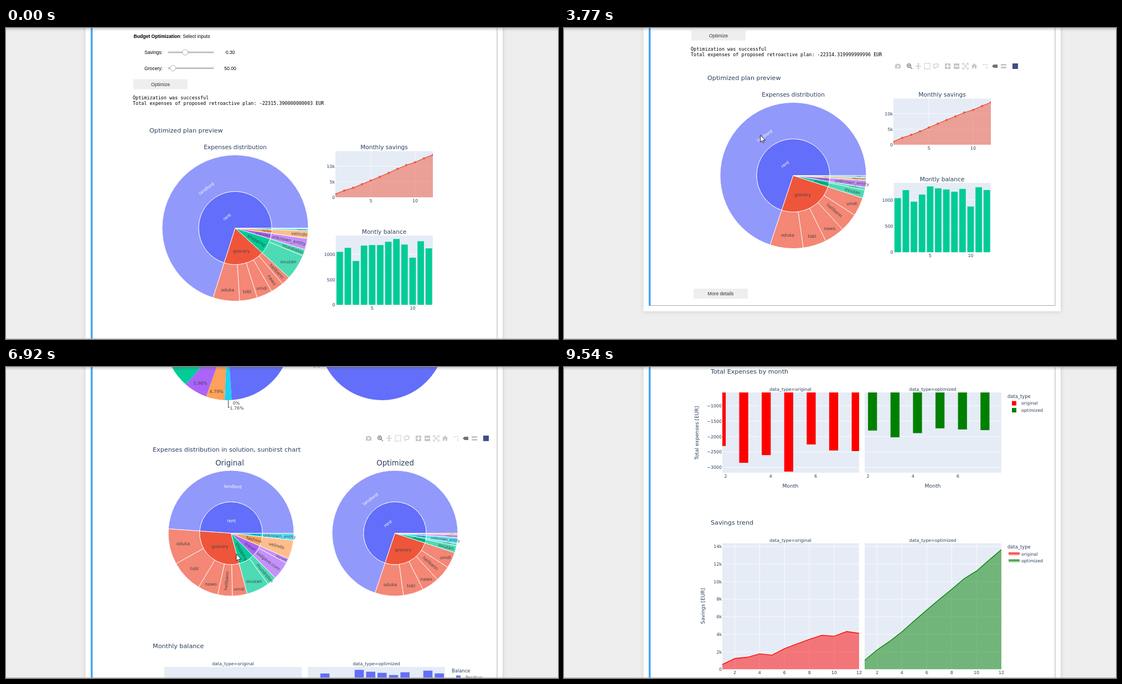
An HTML page with a canvas that plays this animation: 997 px wide and 562 px high, repeating every 9.65 s.

```html
<!DOCTYPE html>
<html lang="en">
<head>
<meta charset="utf-8">
<title>Budget optimization notebook</title>
<style>
html, body { margin: 0; width: 100%; height: 100%; overflow: hidden; background: #eee; }
canvas { display: block; }
</style>
</head>
<body>
<canvas id="stage" width="997" height="562"></canvas>
<script>
const ctx = document.getElementById('stage').getContext('2d');
const LOOP = 9650, INK = '#2a3f5f', PLOT = '#e5ecf6';
const SANS = '"Liberation Sans", Arial, sans-serif';
const CHART = '"DejaVu Sans", Verdana, sans-serif';
const MONO = '"DejaVu Sans Mono", monospace';
const COLOR = { rent: '#636efa', grocery: '#ef553b', shopping: '#00cc96', travel: '#ab63fa',
  fashion: '#ffa15a', unknown: '#19d3f3', income: '#ff6692' };
const PALETTE = Object.values(COLOR);

// Sunburst groups: name, label radius, label mode, children [name, degrees, label radius, mode].
// Modes: r = along the radius, t = along the arc, none = horizontal.
const OLD_PLAN = [
  ['rent', .19, 't', [['landlord', 252.4, .67, 't']]],
  ['grocery', .33, '', [['oduka', 21.1, .85], ['tobl', 14.1, .885], ['umdi', 12.4, .9], ['nawo', 10.4, .87, 'r'], ['hellbann', 7, .82, 'r']]],
  ['shopping', .335, 'r', [['ovuzan', 20.3, .86], ['mundrelon', 5.1, .84, 'r']]],
  ['unknown', .39, 'r', [['unknown_entity', 8.9, .75, 'r']]],
  ['fashion', .44, 'r', [['velindo', 6.1, .88, 'r']]],
  ['travel', .45, 'r', [['lodgavo.com', 1.7, .91, 'r'], ['skyvelt', .5, .9, 'r']]]];
const OPTIMIZED = [
  ['rent', .19, 't', [['landlord', 251.6, .67, 't']]],
  ['grocery', .29, '', [['oduka', 26.3, .82], ['tobl', 18.6, .87], ['nawo', 16, .88], ['hellbann', 14.65, .74, 'r'], ['umdi', 14.85, .89]]],
  ['shopping', .4, 'r', [['ovuzan', 6.5, .84, 'r'], ['mundrelon', 2, .84, 'r']]],
  ['unknown', .42, 'r', [['unknown_entity', 5.6, .81, 'r']]],
  ['travel', .45, 'r', [['lodgavo.com', 2.4, .9, 'r']]],
  ['fashion', .45, 'r', [['velindo', 1.5, .9, 'r']]]];
const BEFORE = [
  ['rent', .2, 't', [['landlord', 176, .745, 't']]],
  ['grocery', .275, '', [['oduka', 33, .78], ['tobl', 30, .81], ['nawo', 18.8, .87], ['hellbann', 13.5, .76, 'r'], ['umdi', 13.7, .895]]],
  ['shopping', .335, 'r', [['ovuzan', 21, .85], ['mundrelon', 8.7, .83, 'r']]],
  ['travel', .375, 'r', [['lodgavo.com', 17, .74, 'r'], ['skyvelt', 4.5, .89, 'r']]],
  ['fashion', .38, 'r', [['velindo', 17.3, .75, 'r']]],
  ['unknown', .4, 'r', [['unknown_entity', 6.5, .77, 'r']]]];

// Monthly balances
const OLD_BALANCE = [1050, 1130, 870, 1175, 1185, 1185, 1250, 1305, 1195, 935, 1260, 1120];
const OPT_BALANCE = [1035, 1187, 967, 1103, 1258, 1222, 1200, 1157, 1211, 875, 1243, 1189];
const RAW_BALANCE = [560, 685, 140, 390, -145, 735, 540, 520, 475, -110, 525, -200];
const running = a => { let sum = 0; return a.map(v => sum += v); };
const spent = a => a.map(v => v - 2992);

const SCROLL = [[0, 88], [2120, 88], [2120, 0], [3390, 0], [3700, 176], [5750, 176], [6200, 618], [6340, 618],
  [6740, 882], [6880, 882], [7390, 1219], [7550, 1411], [7730, 1411], [7850, 1641], [7900, 1677]];
const POINTER = [[70, 990, 575], [1030, 285, 103], [1250, 285, 103], [1400, 301, 72], [1600, 310, 72], [1780, 285, 107],
  [2030, 285, 107], [2400, 305, 124], [3390, 305, 124], [4300, 436, 308], [4950, 440, 325], [5170, 384, 338],
  [5420, 283, 479], [5560, 283, 479], [5750, 416, 338], [7900, 416, 338], [8670, 313, 70],
  [8710, 313, 70], [9150, 438, 182], [9200, 438, 182], [9540, 990, 575]];
// Toolbar: from, to, x, document y
const TOOLBARS = [[250, 800, 603, 252], [3750, 5400, 603, 245], [6340, 6520, 655, 682], [6520, 7000, 655, 1038],
  [7000, 7740, 655, 1392], [7740, 8000, 655, 1665], [8000, 8300, 655, 1937]];
const ICONS = [ // dx, path, active, filled
  [0, 'M-5-3h2l1-1.5h4l1 1.5h2v7h-10zM0-1.6a2 2 0 1 0 .01 0z', 0, 1],
  [21, 'M-1-4.4a3.4 3.4 0 1 0 .01 0zM1.5 1.5L5 5M-2.5-1h3M-1-2.5v3', 1],
  [37, 'M-5 0H5M0-5V5M-1.5-3.5L0-5 1.5-3.5M-1.5 3.5L0 5 1.5 3.5'],
  [53, 'M-5-5h2m1 0h2m1 0h2m1 0h1v2m0 1v2m0 1v2m0 1v1h-2m-1 0h-2m-1 0h-2m-1 0h-1v-2m0-1v-2m0-1v-2'],
  [69, 'M-3 2C-8-2-1-5 2-4.2S5 2 0 2.3-3 4-4 5'],
  [90, 'M-5-5H5V5H-5zM-1-3.5v2.5h-2.5v2h2.5v2.5h2v-2.5h2.5v-2h-2.5v-2.5z', 0, 1],
  [106, 'M-5-5H5V5H-5zM-3.5-1v2h7v-2z', 0, 1],
  [122, 'M-5-2v-3h3M2-5h3v3M5 2v3H2M-2 5h-3V2M-3-3L3 3M3-3L-3 3'],
  [138, 'M-5.5 0L0-5 5.5 0H4v4.5H1.2V1.5h-2.4v3H-4V0z', 0, 1],
  [158, 'M-4-3h2m1 0h2m1 0h2M3 0v2m0 1v2'],
  [175, 'M-5 0l3-3h7v6h-7z', 1, 1],
  [191, 'M-5-4H5v3H-5zM-5 1H5v3H-5z', 0, 1]].map(i => [i[0], new Path2D(i[1]), i[2], i[3]]);
const ARROW = new Path2D('M0 0V12.4L2.9 9.7 4.7 13.8 6.7 13 4.9 9H8.8Z');

const lerp = (a, b, k) => a + (b - a) * k;
const smooth = k => k * k * (3 - 2 * k);
const unit = (t, a, b) => Math.min(1, Math.max(0, (t - a) / (b - a)));
function track(keys, t, col = 1, ease = k => k) {
  const i = keys.findLastIndex(k => k[0] <= t), a = keys[Math.max(i, 0)], b = keys[i + 1];
  return i < 0 || !b ? a[col] : lerp(a[col], b[col], ease((t - a[0]) / (b[0] - a[0])));
}

function text(str, x, y, { size = 7.92, align = 'left', color = INK, font = CHART, turn = 0, weight = '' } = {}) {
  ctx.save();
  ctx.translate(x, y);
  ctx.rotate(turn * Math.PI / 180);
  ctx.font = `${weight} ${size}px ${font}`;
  ctx.textAlign = align;
  ctx.fillStyle = color;
  ctx.fillText(str, 0, size * .36);
  ctx.restore();
}
const label = (str, x, y, opts) => text(str, x, y, { align: 'center', ...opts });
const title = (str, y) => text(str, 265, y, { size: 11.2 });
function box(x, y, w, h, fill, stroke) {
  ctx.fillStyle = fill;
  ctx.fillRect(x, y, w, h);
  if (stroke) { ctx.strokeStyle = stroke; ctx.lineWidth = 1; ctx.strokeRect(x + .5, y + .5, w - 1, h - 1); }
}
function line(points, color, width = 1) {
  ctx.beginPath();
  points.forEach(p => ctx.lineTo(...p));
  ctx.strokeStyle = color;
  ctx.lineWidth = width;
  ctx.stroke();
}

function sunburst(cx, cy, R, groups, colorOf, zoom = 0) {
  const sizeOf = g => g[3].reduce((s, c) => s + c[1], 0);
  const g0 = sizeOf(groups[0]), g1 = g0 + sizeOf(groups[1]);
  const angle = a => lerp(a, unit(a, g0, g1) * 360, zoom);
  const labels = [];
  function sector(name, from, to, r0, r1, lr, mode, color, alpha) {
    const a = angle(from), b = angle(to), sweep = b - a, rad = Math.PI / 180;
    if (sweep < .1) return;
    ctx.beginPath();
    ctx.arc(cx, cy, r1, -a * rad, -b * rad, true);
    if (r0) ctx.arc(cx, cy, r0, -b * rad, -a * rad);
    else if (sweep < 359.9) ctx.lineTo(cx, cy);
    ctx.closePath();
    ctx.globalAlpha = alpha;
    ctx.fillStyle = color;
    ctx.fill();
    ctx.globalAlpha = 1;
    ctx.strokeStyle = '#fff';
    ctx.lineWidth = .9;
    ctx.stroke();
    const mid = (a + b) / 2, r = lerp(lr, r0 ? .75 : 0, zoom) * R;
    const size = zoom === 1 ? 7.92 : Math.min(7.92, .75 * sweep * rad * Math.max(r, 10));
    let turn = mode ? -mid + (mode === 't' ? 90 : 0) : 0;
    turn -= 180 * Math.round(turn / 180);
    if (size > 1.5) labels.push([name, cx + r * Math.cos(mid * rad), cy - r * Math.sin(mid * rad),
      { size, turn: turn * (1 - zoom), color: color === COLOR.rent ? '#fff' : '#444' }]);
  }
  let at = 0;
  groups.forEach(([name, lr, mode, children], i) => {
    const color = colorOf(name, i), start = at;
    for (const [child, size, childR, childMode] of children)
      sector(child, at, at += size, R / 2, R, childR, childMode, color, .7);
    sector(name, start, at, 0, R / 2, lr, mode, color, 1);
  });
  labels.forEach(l => label(...l));
}

function donut(cx, cy, name, slices) {
  let at = -Math.PI / 2;
  for (const [key, share] of slices) {
    ctx.beginPath();
    ctx.arc(cx, cy, 114, at, at + share * Math.PI * .02);
    ctx.arc(cx, cy, 45.5, at += share * Math.PI * .02, at - share * Math.PI * .02, true);
    ctx.fillStyle = COLOR[key];
    ctx.fill();
  }
  label(name, cx - 1, cy, { size: 13.2 });
}

function plot(x, y, w, h, [x0, x1], [y0, y1], xTicks, yTicks, { format = String, grid = false, yLabels = true } = {}) {
  const X = v => x + (v - x0) / (x1 - x0) * w, Y = v => y + h - (v - y0) / (y1 - y0) * h;
  box(x, y, w, h, PLOT);
  for (const v of xTicks) {
    if (grid) line([[X(v), y], [X(v), y + h]], '#fff', .8);
    label(v, X(v), y + h + 6);
  }
  for (const v of yTicks) {
    line([[x, Y(v)], [x + w, Y(v)]], '#fff', v ? .8 : 1.3);
    if (yLabels) text(format(v), x - 1, Y(v), { align: 'right' });
  }
  return { x, y, w, h, X, Y };
}
const inside = (p, draw) => {
  ctx.save();
  ctx.beginPath();
  ctx.rect(p.x, p.y, p.w, p.h);
  ctx.clip();
  draw();
  ctx.restore();
};
const bars = (p, values, width, shift, colorOf) => inside(p, () => values.forEach((v, i) => {
  const left = p.X(i + 1 + shift - width / 2), right = p.X(i + 1 + shift + width / 2);
  box(left, p.Y(Math.max(v, 0)), right - left, Math.abs(p.Y(v) - p.Y(0)), colorOf(v));
}));
const area = (p, values, color, dots) => inside(p, () => {
  const points = values.map((v, i) => [p.X(i + 1), p.Y(v)]);
  ctx.beginPath();
  [[p.X(1), p.Y(0)], ...points, [p.X(12), p.Y(0)]].forEach(q => ctx.lineTo(...q));
  ctx.globalAlpha = .5;
  ctx.fillStyle = color;
  ctx.fill();
  ctx.globalAlpha = 1;
  line(points, color, 1.35);
  if (dots) points.forEach(q => { ctx.beginPath(); ctx.arc(...q, 2, 0, 7); ctx.fill(); });
});
const kilo = v => v ? v / 1000 + 'k' : '0';
const minus = v => String(v).replace('-', '\u2212');
const range = (a, b, step) => Array.from({ length: Math.floor((b - a) / step) + 1 }, (_, i) => a + i * step);

function slider(y, name, knob, value) {
  text(name, 283, y, { size: 8.6, align: 'right', color: '#000', font: SANS });
  box(292.5, y - 1.4, 82.5, 2.8, '#bdbdbd');
  ctx.beginPath();
  ctx.arc(knob, y, 5.1, 0, 7);
  ctx.fillStyle = '#fff';
  ctx.fill();
  ctx.strokeStyle = '#9e9e9e';
  ctx.lineWidth = .8;
  ctx.stroke();
  label(value.toFixed(2), 405, y, { size: 8.6, color: '#000', font: SANS });
}
function button(name, x, y, [px, py]) {
  ctx.save();
  if (px > x && px < x + 98 && Math.abs(py - y) < 9) {
    ctx.shadowColor = 'rgba(0,0,0,.3)'; ctx.shadowBlur = 3; ctx.shadowOffsetY = 1.5;
  }
  box(x, y - 9, 98, 18, '#eee');
  ctx.restore();
  label(name, x + 49, y, { size: 8.6, color: '#333', font: SANS });
}

function toolbar(x, y) {
  for (const [dx, path, active, filled] of ICONS) {
    ctx.save();
    ctx.translate(x + dx, y);
    ctx.fillStyle = ctx.strokeStyle = `rgba(68,68,68,${active ? .75 : .3})`;
    ctx.lineWidth = 1.3;
    filled ? ctx.fill(path, 'evenodd') : ctx.stroke(path);
    ctx.restore();
  }
  box(x + 207, y - 5, 10, 10, '#3f4f85');
}

function preview(t, old) {
  const y = old ? 7 : 0, balance = old ? OLD_BALANCE : OPT_BALANCE;
  text('Optimized plan preview', 259, 266 + y, { size: 11.2 });
  [['Expenses distribution', 414, 296], ['Monthly savings', 683, 296], ['Montly balance', 683, 449]]
    .forEach(([s, x, top]) => label(s, x, top + y, { size: 10.56 }));
  sunburst(414, 442.5 + y, 132, old ? OLD_PLAN : OPTIMIZED, (name, i) => PALETTE[i],
    old ? 0 : smooth(unit(t, 4370, 4950)));
  area(plot(595, 303.5 + y, 176, 83.5, [1, 12], [0, 14850], [5, 10], [0, 5000, 10000], { format: kilo, grid: true }),
    running(balance), COLOR.grocery, true);
  bars(plot(595.5, 456 + y, 175.5, 125.5, [.5, 12.5], [0, Math.max(...balance) * 1.0526], [5, 10], [0, 500, 1000]),
    balance, .8, 0, () => COLOR.shopping);
  if (t > 5060 && t < 5260) {
    box(497, 528, 28, 15, '#fff');
    ctx.beginPath();
    [[449, 542], [454, 537], [454, 528.5], [496, 528.5], [496, 554], [454, 554], [454, 547]].forEach(p => ctx.lineTo(...p));
    ctx.closePath();
    ctx.fillStyle = COLOR.grocery;
    ctx.fill();
    ctx.strokeStyle = '#444';
    ctx.lineWidth = .8;
    ctx.stroke();
    text('hellbann', 456, 536, { size: 8.5, color: '#444', font: SANS });
    text('920.06', 456, 547, { size: 8.5, color: '#444', font: SANS });
    text('trace 0', 498, 536, { size: 8.5, color: COLOR.grocery, font: SANS });
  }
}

function swatches(x, y, items, gap = 17) {
  items.forEach(([name, color], i) => {
    box(x, y + i * 12.6 - 4, 8, 8, color);
    text(name, x + gap, y + i * 12.6);
  });
}
function facets(y, x, xTitle, yTitle, yMid, yX) {
  label('data_type=original', x[0], y);
  label('data_type=optimized', x[1], y);
  if (xTitle) x.forEach(cx => label('Month', cx, xTitle, { size: 9.2 }));
  label(yTitle, yX, yMid, { size: 9.2, turn: -90 });
}

function details(t) {
  title('Expenses distribution in solution', 703);
  donut(400, 855, 'Original', [['rent', 48.95], ['unknown', 1.76], ['fashion', 4.79], ['travel', 5.98], ['shopping', 8.22], ['grocery', 30.3]]);
  donut(679, 855, 'Optimized', [['rent', 69.94], ['fashion', .388], ['travel', .673], ['unknown', 1.55], ['shopping', 2.35], ['grocery', 25.1]]);
  [['30.3%', 335, 809], ['8.22%', 324, 906], ['5.98%', 351, 938], ['4.79%', 380, 953], ['0%', 416, 974], ['1.76%', 417, 983],
    ['25.1%', 622, 799], ['2.35%', 582, 863], ['1.55%', 551, 879], ['0.673%', 551, 888], ['0.388%', 551, 897], ['0%', 561, 907]]
    .forEach(([s, x, y]) => label(s, x, y, { color: '#444' }));
  label('48.9%', 479, 853, { color: '#fff' });
  label('69.9%', 743, 902, { color: '#fff' });
  line([[401.5, 969], [401.5, 982.5], [404, 982.5]], '#444');
  line([[566, 888], [570.5, 886], [570.5, 906], [567, 906]], '#444');
  line([[567, 897], [570.5, 894]], '#444');
  swatches(812, 750, Object.entries(COLOR));

  title('Expenses distribution in solution, sunbirst chart', 1058.5);
  label('Original', 404, 1082.5, { size: 13.2 });
  label('Optimized', 703, 1082.5, { size: 13.2 });
  sunburst(406.5, 1209.5, 113.5, BEFORE, name => COLOR[name]);
  sunburst(702.5, 1209.5, 113.5, OPTIMIZED, name => COLOR[name]);

  title('Monthly balance', 1413);
  facets(1445, [410, 669], 1619.5, 'Balance [EUR]', 1523, 245);
  [RAW_BALANCE, OPT_BALANCE].forEach((values, i) => bars(
    plot(286 + i * 259, 1451, 248, 145, [.5, 12.5], [-248, 1316], [5, 10], [0, 500, 1000], { yLabels: !i }),
    values, .8, 0, v => v < 0 ? COLOR.grocery : COLOR.rent));
  text('Balance', 805, 1458, { size: 8.4 });
  swatches(813, 1470.5, [['Positive', COLOR.rent], ['Negative', COLOR.grocery]]);

  const zoomed = t >= 9200, kinds = [['original', 'red'], ['optimized', 'green']];
  title('Total Expenses by month', 1685);
  [RAW_BALANCE, OPT_BALANCE].forEach((values, i) => {
    const p = plot(286 + i * 257, 1723, 247, 145, zoomed ? [1.85, 7.93] : [.5, 12.5], zoomed ? [-3173, -570] : [-3364, 0],
      zoomed ? [2, 4, 6] : [5, 10], zoomed ? range(-3000, -1000, 500) : range(-3000, 0, 1000), { format: minus, yLabels: !i });
    bars(p, spent(values), .4, i ? .2 : -.2, () => kinds[i][1]);
  });
  facets(1717.5, [409, 666], 1892, 'Total expenses [EUR]', 1796, 240);
  text('data_type', 801, 1730, { size: 8.4 });
  swatches(809, 1742.5, kinds);

  title('Savings trend', 1958);
  facets(1990, [409, 666], 0, 'Savings [EUR]', 2109, 251);
  [RAW_BALANCE, OPT_BALANCE].forEach((values, i) => {
    area(plot(286 + i * 257, 1995.5, 247, 228, [1, 12], [0, 14376], range(2, 12, 2), range(0, 14000, 2000),
      { format: kilo, grid: true, yLabels: !i }), running(values), kinds[i][1]);
    const y = 2015 + i * 12.6;
    ctx.globalAlpha = .5;
    box(803, y - 2, 20, 4, kinds[i][1]);
    ctx.globalAlpha = 1;
    line([[803, y - 2], [823, y - 2]], kinds[i][1], 1.35);
    text(kinds[i][0], 826, y);
  });
  text('data_type', 801, 2002, { size: 8.4 });
}

function zoomBox(x, y) {
  ctx.beginPath();
  ctx.rect(286, 1723, 247, 145);
  ctx.rect(313, 1747, x - 313, y - 1747);
  ctx.fillStyle = 'rgba(0,0,0,.3)';
  ctx.fill('evenodd');
}

function pointer(t, x, y) {
  const cross = (t > 7250 && t < 7740) || (t > 8550 && t < 9330);
  ctx.save();
  ctx.translate(x, y);
  if (cross) {
    line([[-8, -.5], [8, -.5]], '#555');
    line([[-.5, -8], [-.5, 8]], '#555');
  } else {
    ctx.fillStyle = '#fff';
    ctx.fill(ARROW);
    ctx.strokeStyle = '#222';
    ctx.lineWidth = 1;
    ctx.stroke(ARROW);
  }
  ctx.restore();
}

function draw(t) {
  const old = t < 2120, output = old || t >= 3000, charts = old || t >= 3120, open = t >= 5560;
  const scroll = track(SCROLL, t), px = track(POINTER, t, 1, smooth), py = track(POINTER, t, 2, smooth);
  const bottom = open ? 2400 : old ? 696 : charts ? 688 : output ? 245 : 218, shift = charts ? 0 : 7.5;
  const at = [px - shift, py + scroll];

  box(0, 0, 997, 562, '#eee');
  ctx.save();
  ctx.translate(shift, -scroll);
  ctx.save();
  ctx.shadowColor = 'rgba(87,87,87,.25)';
  ctx.shadowBlur = 8;
  box(143.5, 12, 753.5, bottom - 12, '#fff');
  ctx.restore();
  text('Out[2]:', 185.5, 44, { size: 8.3, font: MONO, color: '#b5571b' });
  box(228.5, 38, 174, 16, '#efefef', '#767676');
  label('Click here to toggle on/off the raw code.', 315.5, 46, { size: 8.8, color: '#000', font: SANS });
  box(153, 86, 734.5, bottom - 96, '#fff', '#ababab');
  box(153, 86, 3.5, bottom - 96, '#42a5f5');

  const drag = unit(t, 1400, 1600);
  text('Budget Optimization', 230.5, 103, { size: 8.6, weight: 'bold', color: '#000', font: SANS });
  text(': Select inputs', 314.5, 103, { size: 8.6, color: '#000', font: SANS });
  slider(132, 'Savings:', 323.7, .3);
  slider(160.7, 'Grocery:', lerp(301.5, 310.7, drag), 50 + 5 * Math.round(11 * drag));
  button('Optimize', 230, 189.5, at);
  if (output) {
    const total = old ? '-22315.390000000003' : '-22314.319999999996';
    ['Optimization was successful', `Total expenses of proposed retroactive plan: ${total} EUR`]
      .forEach((s, i) => text(s, 229, 213.5 + i * 10.7, { size: 8.45, color: '#000', font: MONO }));
  }
  if (charts) {
    preview(t, old);
    button(open ? 'Close details' : 'More details', 234, old ? 663 : 656, at);
  }
  if (open) details(t);
  if (t > 8710 && t < 9200) zoomBox(...at);
  for (const [from, to, x, y] of TOOLBARS) if (t >= from && t < to) toolbar(x, y);
  ctx.restore();

  const shade = ctx.createLinearGradient(0, 0, 0, 6);
  shade.addColorStop(0, 'rgba(87,87,87,.28)');
  shade.addColorStop(1, 'rgba(87,87,87,0)');
  box(0, 0, 997, 6, shade);
  pointer(t, px, py);
  box(0, 561, 997, 1, '#b8b8b8');
}

const start = performance.now();
function tick() {
  draw((performance.now() - start) % LOOP);
  requestAnimationFrame(tick);
}
tick();
</script>
</body>
</html>
```
